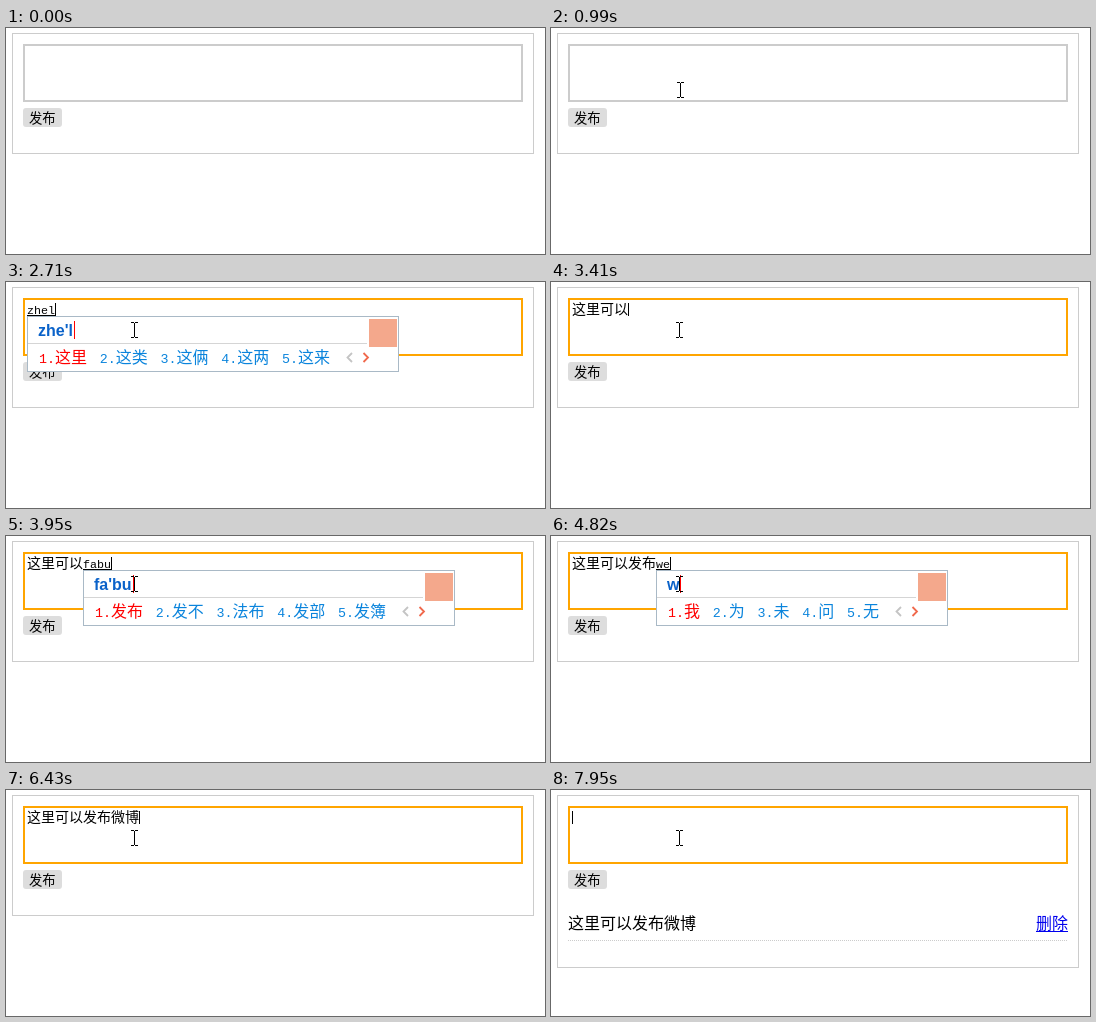
An HTML page for the animation above (8 s loop, 539 by 226 pixels).

```html
<!DOCTYPE html>
<html lang="zh-CN">
<head>
<meta charset="utf-8">
<title>发布</title>
<style>
html, body { margin: 0; width: 100%; height: 100%; overflow: hidden; background: #fff; }
svg { display: block; }
text { font-family: "Noto Sans CJK SC", "Noto Sans CJK", "Noto Sans CJK JP", sans-serif; white-space: pre; }
rect, .crisp { shape-rendering: crispEdges; }
.mono { font-family: "Liberation Mono", monospace; }
.pinyin { font: bold 16px "Liberation Sans", Arial, sans-serif; fill: #0a62c9; }
</style>
</head>
<body>
<svg id="stage" width="539" height="226" viewBox="0 0 539 226"></svg>
<script>
const LOOP = 8000;
const POST = '这里可以发布微博';
const FOCUS = 1290, BLUR = 7390, REFOCUS = 7950;

// time, committed characters, inline letters, pinyin in the popup, candidates
const STEPS = [
  [0, 0, ''],
  [2430, 0, 'z', 'z', '在 中 这 做 真'],
  [2560, 0, 'zhe', 'zh', '这 中 只 着 种'],
  [2710, 0, 'zhel', "zhe'l", '这里 这类 这俩 这两 这来'],
  [2830, 2, ''],
  [3110, 2, 'k', 'k', '看 可 口 快 开'],
  [3270, 2, 'key', "ke'y", '可以 可疑 科研 key 可用'],
  [3410, 4, ''],
  [3530, 4, 'f'],
  [3680, 4, 'fa', 'f', '发 非 分 放 法'],
  [3830, 4, 'fab', "fa'b", '发布 发表 发不 发包 发不出'],
  [3950, 4, 'fabu', "fa'bu", '发布 发不 法布 发部 发簿'],
  [4260, 6, ''],
  [4820, 6, 'we', 'w', '我 为 未 问 无'],
  [4960, 6, 'wei', 'we', '为 未 位 微 围'],
  [5080, 6, 'weib', "wei'b", '微博 尾部 未必 外部 围脖'],
  [5200, 6, 'weibo', "wei'b", '微博 尾部 未必 外部 围脖'],
  [5350, 6, 'weibo', "wei'bo", '微博 围脖 尾播 伟博 微薄'],
  [5480, 8, ''],
  [BLUR, 0, '']
];

// time, caret visible
const CARET = [[0, 0], [FOCUS, 1], [1720, 0], [2280, 1], [5900, 0], [6430, 1], [6960, 0], [REFOCUS, 1]];

// time, pointer kind, left, top
const POINTER = [
  [0, '', 0, 0],
  [530, 'arrow', 277, 201],
  [680, 'arrow', 235, 180],
  [830, 'arrow', 133, 94],
  [990, 'beam', 126, 54],
  [1140, 'beam', 125, 40]
];

const stage = document.getElementById('stage');

function add(parent, tag, attrs, content) {
  const el = document.createElementNS('http://www.w3.org/2000/svg', tag);
  for (const key in attrs) el.setAttribute(key, attrs[key]);
  if (content) el.textContent = content;
  parent.append(el);
  return el;
}
const group = parent => add(parent, 'g', {});
const box = (parent, x, y, width, height, fill) => add(parent, 'rect', { x, y, width, height, fill });
const label = (parent, x, y, size, fill, content, cls = '') =>
  add(parent, 'text', { x, y, 'font-size': size, fill, class: cls }, content);
const outline = (x, y, w, h, stroke, line) => add(stage, 'rect', {
  x: x + line / 2, y: y + line / 2, width: w - line, height: h - line,
  fill: 'none', stroke, 'stroke-width': line
});
const show = (el, on) => el.setAttribute('visibility', on ? 'visible' : 'hidden');
const latest = (table, t) => table.findLast(row => row[0] <= t);

const panel = outline(6, 5, 522, 121, '#ccc', 1);
const area = outline(17, 16, 500, 58, '#ccc', 2);
add(stage, 'rect', { x: 17, y: 80, width: 39, height: 19, rx: 3, fill: '#ddd', style: 'shape-rendering:auto' });
label(stage, 23, 95, 13.33, '#000', '发布');

const item = group(stage);
label(item, 17, 139, 16, '#000', POST);
label(item, 485, 139, 16, '#00e', '删除');
box(item, 485, 141, 32, 1, '#00e');
add(item, 'path', { d: 'M17 150.5H517', stroke: '#ccc', 'stroke-dasharray': '1 1', class: 'crisp' });

const typed = label(stage, 21, 32, 14, '#000', '');
const inline = label(stage, 21, 32, 11.67, '#000', '', 'mono');
const underline = box(stage, 21, 33, 0, 1, '#000');
const caret = box(stage, 21, 21, 1, 13, '#000');
const popup = group(stage);

const arrow = add(stage, 'path', {
  d: 'M.5 .5V16.5L4.2 13L6.6 18.5L9 17.5L6.7 12H11.5Z', fill: '#fff', stroke: '#000'
});
const beam = add(stage, 'path', {
  d: 'M0 .5H3M4 .5H7M3.5 1V15M0 15.5H3M4 15.5H7', fill: 'none', stroke: '#000', class: 'crisp'
});

const textWidth = s => [...s].reduce((sum, c) => sum + (c < '\x7f' ? 8 : 16), 0);

function drawPopup(left, pinyin, words) {
  popup.replaceChildren();
  if (!pinyin) return;
  const list = words.split(' ');
  const end = left + 12 + list.reduce((sum, w) => sum + 16 + textWidth(w), 0) + 51;
  const right = end + 69;
  add(popup, 'rect', {
    x: left + .5, y: 34.5, width: right - left - 1, height: 55, fill: '#fff', stroke: '#a9b9c6'
  });
  box(popup, left + 1, 61, right - left - 33, 1, '#d5d5d5');
  box(popup, right - 30, 37, 28, 28, '#f4a88c');

  const head = label(popup, left + 11, 54, 16, '#0a62c9', pinyin, 'pinyin');
  box(popup, Math.round(left + 12 + head.getComputedTextLength()), 39, 1, 18, '#f00');

  let x = left + 12;
  list.forEach((word, i) => {
    const color = i ? '#0a84dc' : '#f00';
    label(popup, x, 81, 13.33, color, i + 1 + '.', 'mono');
    const latin = word < '\x7f';
    label(popup, x + 16, 81, latin ? 13.33 : 16, color, word, latin ? 'mono' : '');
    x += 28.75 + textWidth(word);
  });
  const chevron = (d, stroke) => add(popup, 'path', { d, stroke, fill: 'none', 'stroke-width': 1.8 });
  chevron(`M${end + 22} 71l-4.5 4.5l4.5 4.5`, '#c4c4c4');
  chevron(`M${end + 33.5} 71l4.5 4.5l-4.5 4.5`, '#f0694c');
}

let current;
function drawText(step) {
  if (step === current) return;
  current = step;
  const [, count, letters, pinyin, words] = step;
  const left = 21 + 14 * count, width = 7 * letters.length;
  typed.textContent = POST.slice(0, count);
  inline.textContent = letters;
  inline.setAttribute('x', left);
  underline.setAttribute('x', left);
  underline.setAttribute('width', width);
  caret.setAttribute('x', left + width);
  drawPopup(left, pinyin, words);
}

function render(t) {
  const focused = t >= FOCUS && t < BLUR || t >= REFOCUS;
  const posted = t >= BLUR;
  area.setAttribute('stroke', focused ? '#ffa500' : '#ccc');
  panel.setAttribute('height', posted ? 172 : 120);
  show(item, posted);
  drawText(latest(STEPS, t));
  show(caret, latest(CARET, t)[1]);

  const [, kind, x, y] = latest(POINTER, t);
  for (const [el, name] of [[arrow, 'arrow'], [beam, 'beam']]) {
    show(el, kind === name);
    el.setAttribute('transform', `translate(${x} ${y})`);
  }
}

function tick() {
  render(performance.now() % LOOP);
  requestAnimationFrame(tick);
}
tick();
</script>
</body>
</html>
```
